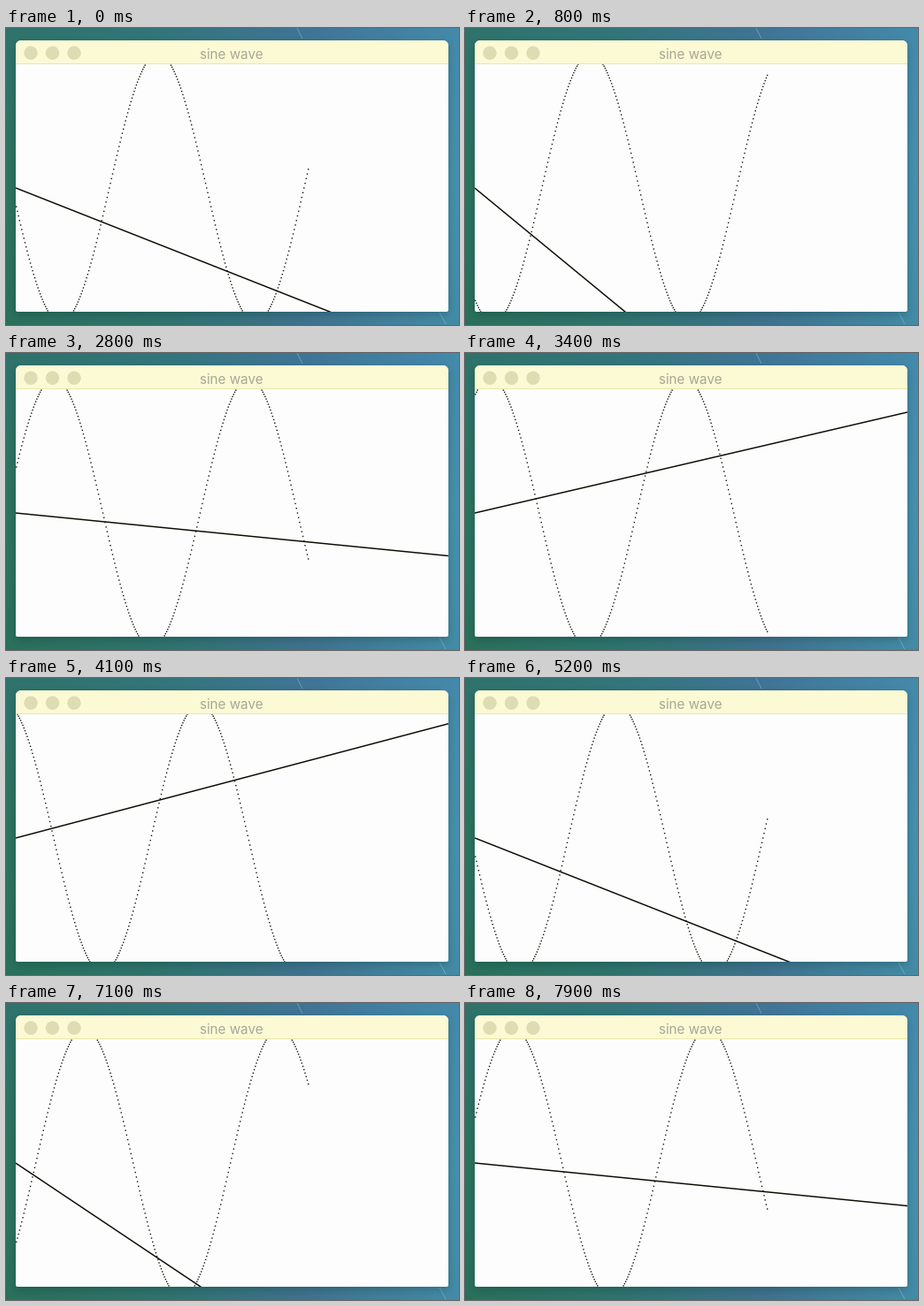
Animation, 512 px wide and 336 px high, one loop 8 s. Source, as an HTML page with a canvas:

```html
<!DOCTYPE html>
<html>
<head>
<meta charset="utf-8">
<title>sine wave</title>
<style>
html, body { margin: 0; width: 100%; height: 100%; overflow: hidden; }
canvas { display: block; }
</style>
</head>
<body>
<canvas id="stage" width="512" height="336"></canvas>
<script>
const ctx = document.getElementById('stage').getContext('2d');
const LEFT = 11, TOP = 14, RIGHT = 500, BOTTOM = 321, BAR = 41;
const MID = 181, AMP = 152, SCALE = 11 / 9;
const TICK = 100, TICKS = 80, PAUSE = 8;

const cosDeg = a => Math.cos(a * Math.PI / 180);

function gradient(x1, y1, ...colors) {
  const g = ctx.createLinearGradient(0, 0, x1, y1);
  colors.forEach((c, i) => g.addColorStop(i / (colors.length - 1), c));
  return g;
}

function streak(x0, y0, x1, y1) {
  ctx.strokeStyle = 'rgba(160,205,215,.45)';
  ctx.beginPath();
  ctx.moveTo(x0, y0);
  ctx.lineTo(x1, y1);
  ctx.stroke();
}

function drawDesktop() {
  ctx.fillStyle = gradient(512, 0, '#2b735c', '#30766f', '#417592', '#4690ac');
  ctx.fillRect(0, 0, 512, 336);
  ctx.fillStyle = gradient(0, 336, 'rgba(60,110,165,.2)', 'rgba(60,110,165,0)', 'rgba(0,40,40,.05)');
  ctx.fillRect(0, 0, 512, 336);
  streak(329, 0, 335, 12);
  streak(490, 322, 497, 335);
}

function windowPath() {
  ctx.beginPath();
  ctx.roundRect(LEFT, TOP, RIGHT - LEFT, BOTTOM - TOP, [6, 6, 2, 2]);
}

function drawWindow() {
  ctx.save();
  ctx.shadowColor = 'rgba(0,30,30,.25)';
  ctx.shadowBlur = 10;
  ctx.shadowOffsetY = 3;
  ctx.fillStyle = '#fdfdfe';
  windowPath();
  ctx.fill();
  ctx.restore();

  ctx.save();
  windowPath();
  ctx.clip();
  ctx.fillStyle = '#fbfad4';
  ctx.fillRect(LEFT, TOP, RIGHT - LEFT, BAR - TOP);
  ctx.fillStyle = '#ebe7ab';
  ctx.fillRect(LEFT, BAR - 1, RIGHT - LEFT, 1);
  ctx.restore();

  ctx.fillStyle = '#dedcb3';
  for (const x of [28, 52.5, 77]) {
    ctx.beginPath();
    ctx.arc(x, 28.3, 7.7, 0, 7);
    ctx.fill();
  }
  ctx.fillStyle = '#a8a797';
  ctx.font = '15.2px Inter, Roboto, sans-serif';
  ctx.textAlign = 'center';
  ctx.fillText('sine wave', 254.7, 34.5);
}

function drawPlot(angle) {
  ctx.save();
  ctx.beginPath();
  ctx.rect(LEFT, BAR, RIGHT - LEFT, BOTTOM - BAR);
  ctx.clip();

  ctx.fillStyle = '#141405';
  for (let i = 0; i <= 270; i++) {
    const y = MID + AMP * cosDeg(2 * i + angle);
    ctx.fillRect(LEFT + i * SCALE, y - 0.7, 1.4, 1.4);
  }

  const slope = 0.309 + 0.614 * cosDeg(angle);
  ctx.strokeStyle = '#0c0c02';
  ctx.lineWidth = 1.5;
  ctx.beginPath();
  ctx.moveTo(LEFT, MID);
  ctx.lineTo(RIGHT, MID + slope * (RIGHT - LEFT));
  ctx.stroke();
  ctx.restore();
}

// 7 degrees per tick, restarting after 51 steps, with one held tick per loop
function angleAt(ms) {
  const tick = Math.floor(ms / TICK) % TICKS;
  const step = 40 + tick - (tick >= PAUSE ? 1 : 0);
  return 7 * (step % 51) - 2;
}

const start = performance.now();
function frame() {
  drawDesktop();
  drawWindow();
  drawPlot(angleAt(performance.now() - start));
  requestAnimationFrame(frame);
}
frame();
</script>
</body>
</html>
```
